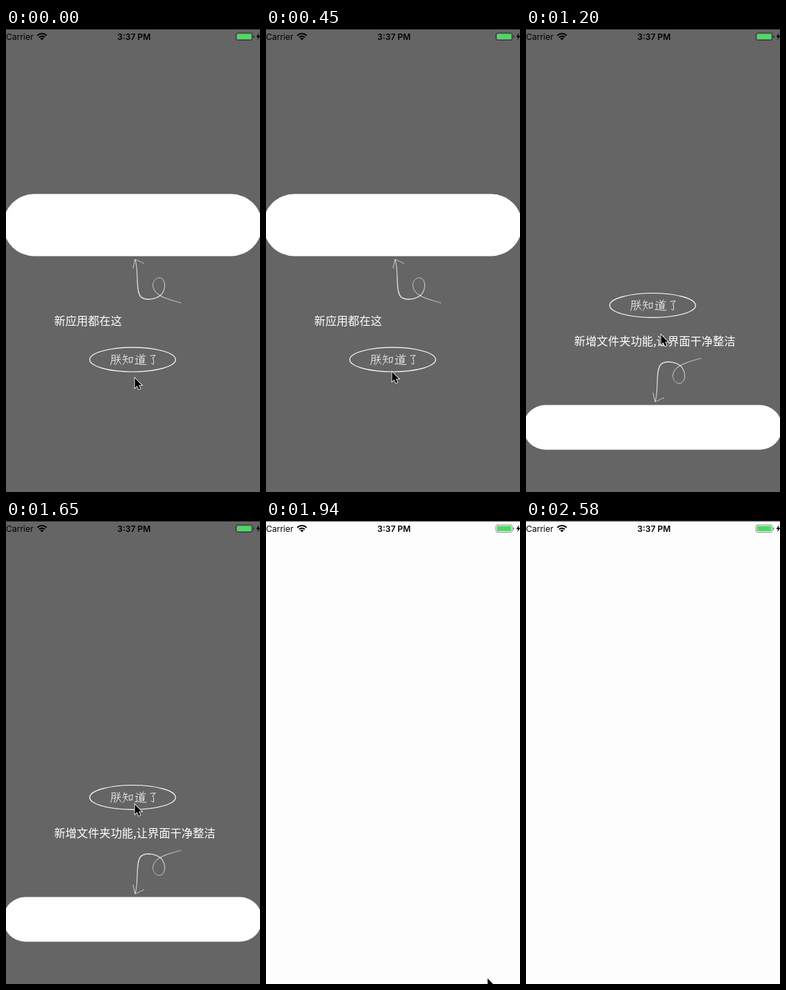
These frames come from a looping animation (364 by 664 pixels, 2.64 s). An HTML page with a canvas:

```html
<!DOCTYPE html>
<html lang="zh">
<head>
<meta charset="utf-8">
<title>Onboarding hints</title>
<style>
  html, body { margin: 0; width: 100%; height: 100%; overflow: hidden; background: #fdfdfd; }
  canvas { display: block; width: 364px; height: 664px; }
</style>
</head>
<body>
<canvas role="img" aria-label="朕知道了"></canvas>
<script>
const W = 364, H = 664, LOOP = 2640;
const canvas = document.querySelector('canvas');
const ctx = canvas.getContext('2d');
const ratio = window.devicePixelRatio || 1;
canvas.width = W * ratio;
canvas.height = H * ratio;

const UI = 'Inter, Roboto, sans-serif';
const CJK = '"Noto Sans CJK SC", "Noto Sans CJK", sans-serif';

// [start ms, left, top]; the pointer jumps between samples
const pointerSteps = [
  [0, 183, 500], [150, 208, 503], [300, 188, 450], [450, 179, 491],
  [900, 205, 514], [1050, 207, 504], [1200, 192, 438], [1350, 181, 405],
  [1650, 183, 406], [1790, 284, 569], [1940, 316, 655], [2090, 0, -50]
];
// [start ms, opacity of the dimming layer]
const dimSteps = [[0, 0.6], [1790, 0.32], [1940, 0]];

const at = (steps, t) => steps.filter(s => s[0] <= t).pop();

// Handwritten button lettering, one path per character
const lettering = [
  // 朕
  'M152 468C152.5 474 151.5 478 150 482M152 468.6L156.5 468C156.5 473 157 478 155 481.5' +
  'M152 472.5l4-.5M152 476l4-.5M159 467.5l1 2M163 467l-1.2 2.5M158.5 471.5l5-.7' +
  'M157.8 475l6.7-1M161.2 471C161 476 159.5 479 157 482M161 475.5L164.8 481',
  // 知
  'M170 467.5l-2 4.5M169.5 470.5l4.5-.7M167.5 474.5l7.5-1' +
  'M171.8 470C171.5 476 170 479 167.5 482M171.5 476l3 3.5' +
  'M176.5 472l.5 7M176.5 472l5-1l-1 7.5M177 478.5l3.5-.5',
  // 道
  'M187 468.5l1.5 2M185.5 473.5l3-.5l-1.5 4C189 478 188 480 186 481' +
  'M185 480.8C189 479.5 193 482.5 201 481.5M192 467l1.2 2M197 466.5l-1.5 2.5' +
  'M190 470.5l10-1M195 470l-1.5 2.5M191.5 473l.5 6.5M191.5 473l6.5-.7l-.5 6.7' +
  'M192 475.2l5.5-.4M192 477.2l5.5-.3M192 479.3l5.5-.4',
  // 了
  'M207 469l7-.7l-3.5 4.2M210.5 472C212 476 212 480 211 481.5l-2.5-1.7'
].map(d => new Path2D(d));

// Cubic pieces of the looping arrow, from tip to tail
const arrow = [
  [185, 331, 190, 347, 186, 373, 192, 383],
  [192, 383, 197, 391, 214, 389, 222, 382],
  [222, 382, 230, 374, 229, 358, 220, 357.5],
  [220, 357.5, 214, 357, 210, 364, 210.5, 369],
  [210.5, 369, 212, 384, 233, 388, 251, 393.5]
];

function bezier(p, u) {
  const v = 1 - u;
  const mix = i => v * v * v * p[i] + 3 * v * v * u * p[i + 2] + 3 * v * u * u * p[i + 4] + u * u * u * p[i + 6];
  return [mix(0), mix(1)];
}

function line(x1, y1, x2, y2, width) {
  ctx.lineWidth = width;
  ctx.beginPath();
  ctx.moveTo(x1, y1);
  ctx.lineTo(x2, y2);
  ctx.stroke();
}

function text(str, x, y, font, color, align = 'left') {
  ctx.font = font;
  ctx.fillStyle = color;
  ctx.textAlign = align;
  ctx.fillText(str, x, y);
}

function pill(x, y, w, h, r, color) {
  ctx.fillStyle = color;
  ctx.beginPath();
  ctx.roundRect(x, y, w, h, r);
  ctx.fill();
}

function drawArrow(flip) {
  ctx.save();
  if (flip) ctx.transform(1, 0, 0, -1, 0, 866);
  ctx.strokeStyle = 'rgba(255,255,255,.85)';
  ctx.lineCap = 'butt';
  const n = 14, total = arrow.length * n;
  arrow.forEach((piece, k) => {
    for (let i = 0; i < n; i++) {
      const u = (k * n + i) / total;
      const width = 0.65 + 0.9 * Math.exp(-(((u - 0.24) / 0.2) ** 2)) + 0.35 * Math.exp(-(((u - 0.88) / 0.06) ** 2));
      line(...bezier(piece, i / n), ...bezier(piece, (i + 1) / n), width);
    }
  });
  line(185, 331, 182, 344, 0.8);
  line(185, 331, 198, 337, 0.7);
  ctx.restore();
}

function drawButton(dy, pressed) {
  ctx.save();
  ctx.translate(0, dy);
  ctx.globalAlpha *= pressed ? 0.5 : 1;
  ctx.strokeStyle = '#fff';
  ctx.lineWidth = 1.2;
  ctx.beginPath();
  ctx.ellipse(181.5, 474.6, 61.5, 17.4, 0, 0, Math.PI * 2);
  ctx.stroke();
  ctx.lineWidth = 0.85;
  ctx.lineCap = ctx.lineJoin = 'round';
  lettering.forEach(glyph => ctx.stroke(glyph));
  ctx.restore();
}

function drawHint(t) {
  const second = t >= 750;
  if (second) {
    pill(-4, 539.5, 371, 64, 32, '#fff');
    text('新增文件夹功能,让界面干净整洁', 69, 453.5, '16.2px ' + CJK, '#fff');
  } else {
    pill(-4, 237.5, 371, 89, 44.5, '#fff');
    text('新应用都在这', 69, 425, '16.2px ' + CJK, '#fff');
  }
  drawArrow(second);
  drawButton(second ? -77.7 : 0, t >= 1500 && t < 1650);
}

function drawWifi() {
  ctx.save();
  ctx.beginPath();
  ctx.moveTo(51.5, 17.5);
  ctx.lineTo(42.5, 8.5);
  ctx.lineTo(42.5, 5);
  ctx.lineTo(60.5, 5);
  ctx.lineTo(60.5, 8.5);
  ctx.closePath();
  ctx.clip();
  ctx.strokeStyle = ctx.fillStyle = '#000';
  ctx.lineWidth = 2;
  for (const r of [5.6, 9.2]) {
    ctx.beginPath();
    ctx.arc(51.5, 17.3, r, Math.PI, Math.PI * 2);
    ctx.stroke();
  }
  ctx.beginPath();
  ctx.arc(51.5, 17.3, 3.2, Math.PI, Math.PI * 2);
  ctx.lineTo(51.5, 17.3);
  ctx.fill();
  ctx.restore();
}

function drawStatus(t) {
  ctx.fillStyle = t >= 2580 ? '#262626' : '#000';
  ctx.fillRect(0, 0, W, 2);
  text('Carrier', 0, 16.7, '12px ' + UI, '#000');
  text('3:37 PM', 183.5, 16.7, '600 12px ' + UI, '#000', 'center');
  drawWifi();
  ctx.strokeStyle = 'rgba(0,0,0,.45)';
  ctx.lineWidth = 1;
  ctx.beginPath();
  ctx.roundRect(329.5, 7, 23.5, 10.5, 2.5);
  ctx.stroke();
  pill(331, 8.5, 20.5, 7.5, 1, '#4cd964');
  pill(354, 10.5, 1.4, 3.6, 0.7, 'rgba(0,0,0,.5)');
  ctx.fillStyle = '#000';
  ctx.fill(new Path2D('M362.6 7L358.6 13H361.1L360.2 17.2L364.6 11.2H362Z'));
}

const pointerShape = new Path2D('M0 0V14L3.2 11L5.5 16.2L7.9 15.2L5.6 10.2H10Z');

function drawPointer(t) {
  const [, x, y] = at(pointerSteps, t);
  ctx.save();
  ctx.translate(x + 1.6, y + 1);
  ctx.strokeStyle = '#fff';
  ctx.lineWidth = 1.7;
  ctx.lineJoin = 'miter';
  ctx.miterLimit = 3;
  ctx.shadowColor = 'rgba(0,0,0,.3)';
  ctx.shadowBlur = 1.5 * ratio;
  ctx.shadowOffsetY = 0.5 * ratio;
  ctx.stroke(pointerShape);
  ctx.shadowColor = 'transparent';
  ctx.fillStyle = '#000';
  ctx.fill(pointerShape);
  ctx.restore();
}

function draw(now) {
  const t = now % LOOP;
  const dim = at(dimSteps, t)[1];
  ctx.setTransform(ratio, 0, 0, ratio, 0, 0);
  ctx.fillStyle = '#fdfdfd';
  ctx.fillRect(0, 0, W, H);
  if (dim) {
    ctx.fillStyle = `rgba(0,0,0,${dim})`;
    ctx.fillRect(0, 0, W, H);
    drawHint(t);
  }
  drawStatus(t);
  drawPointer(t);
  requestAnimationFrame(draw);
}
requestAnimationFrame(draw);
</script>
</body>
</html>
```
